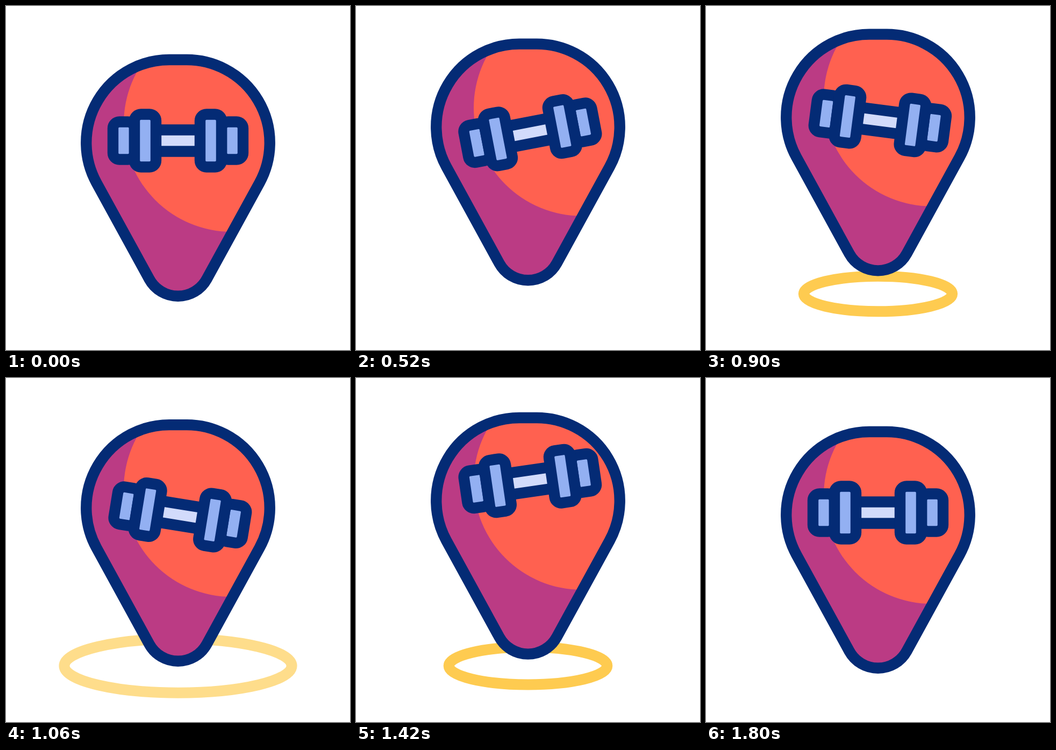
Recreate the animation shown at these times as an HTML page. Size 640 by 640 pixels, loop 2.4 s.

```html
<!DOCTYPE html>
<html lang="en">
<head>
<meta charset="utf-8">
<title>Gym pin</title>
<style>
html, body { margin: 0; height: 100%; overflow: hidden; background: #fff; }
svg { display: block; width: 100%; height: 100%; }
.line { stroke: #042b75; stroke-width: 20.4; }
.ring { fill: none; stroke: #fecb50; stroke-width: 20; }
</style>
</head>
<body>
<svg viewBox="0 0 640 640">
  <defs>
    <path id="drop" d="M304 100h32a154.5 154.5 0 0 1 135.7 228.8L373.5 508a61 61 0 0 1-107 0L168.3 328.8A154.5 154.5 0 0 1 304 100Z"/>
    <clipPath id="inside"><use href="#drop"/></clipPath>
    <g id="weight">
      <rect x="81" y="-35" width="40" height="70" rx="12"/>
      <rect x="41" y="-49" width="40" height="98" rx="12"/>
    </g>
  </defs>
  <ellipse class="ring" cx="320" cy="535.5"/>
  <ellipse class="ring" cx="320" cy="535.5"/>
  <g id="pin">
    <use href="#drop" fill="#bb3b84"/>
    <circle cx="420" cy="219" r="201" fill="#ff6150" clip-path="url(#inside)"/>
    <use href="#drop" class="line" fill="none"/>
  </g>
  <g id="bell" class="line" fill="#93b0f2">
    <rect x="-45" y="-20" width="90" height="40" fill="#d2dbfb"/>
    <use href="#weight"/>
    <use href="#weight" transform="scale(-1 1)"/>
  </g>
</svg>
<script>
const LOOP = 2400;
const pin = document.getElementById('pin');
const bell = document.getElementById('bell');
const rings = document.querySelectorAll('.ring');

const clamp = x => Math.max(0, Math.min(1, x));

// Sine ease from 0 at time a to 1 at time b.
const ramp = (t, a, b) => (1 - Math.cos(Math.PI * clamp((t - a) / (b - a)))) / 2;

// Height of a row of hops, each one shorter and lower than the last.
function hops(t, { start, length, height, count, shorten = 1, lower, skew = 1 }) {
  for (let i = 0; i < count; i++) {
    const u = (t - start) / length;
    if (u < 1) return height * Math.sin(Math.PI * clamp(u) ** skew) ** 2;
    start += length;
    length *= shorten;
    height *= lower;
  }
  return 0;
}

const pinHops = { start: 70, length: 570, height: 79, count: 3, shorten: 0.895, lower: 0.6 };
const bellHops = { start: 340, length: 730, height: 82, count: 2, lower: 0.76, skew: 1.16 };

function drawBell(t) {
  const x = 320 + 3.9 * (ramp(t, 0, 420) - ramp(t, 1400, 1800));
  const sag = 14 * (ramp(t, 0, 340) - ramp(t, 340, 1500));
  const y = 250.5 + sag - hops(t, bellHops);
  const tilt = -13.5 * ramp(t, 0, 380) + 23.1 * ramp(t, 380, 1030)
    - 18.6 * ramp(t, 1030, 1360) + 9 * ramp(t, 1360, 1700);
  bell.setAttribute('transform', `translate(${x} ${y}) rotate(${tilt})`);
}

function drawRing(ring, age) {
  const r = Math.max(0, age * 0.459);
  ring.setAttribute('rx', r);
  ring.setAttribute('ry', r * 0.237);
  ring.setAttribute('opacity', age > 0 ? clamp((540 - age) / 120) : 0);
}

function draw(now) {
  const t = Math.max(0, now) % LOOP;
  pin.setAttribute('transform', `translate(0 ${-hops(t, pinHops)})`);
  drawBell(t);
  rings.forEach((ring, i) => drawRing(ring, t - 600 - 500 * i));
}

const start = performance.now();
function tick() {
  draw(performance.now() - start);
  requestAnimationFrame(tick);
}
tick();
</script>
</body>
</html>
```
